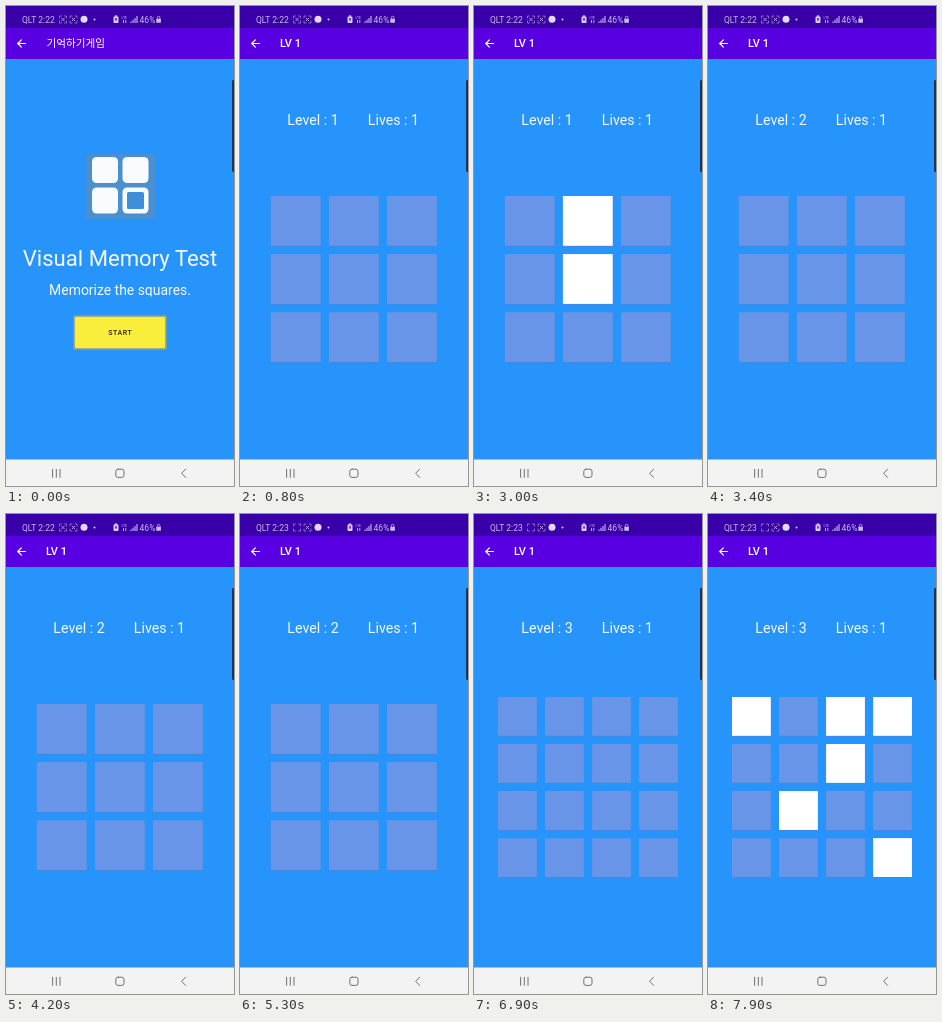
Animation of 228 by 480 pixels, one loop 8 s. Source, as an HTML page:

```html
<!DOCTYPE html>
<html lang="ko">
<head>
<meta charset="utf-8">
<title>Visual Memory Test</title>
<style>
  html, body { margin: 0; width: 100%; height: 100%; overflow: hidden; background: #2694fa; }
  svg { display: block; width: 228px; height: 480px; font-family: Roboto, "Noto Sans CJK KR", "Noto Sans CJK", sans-serif; }
  .title { font-size: 11px; font-weight: 500; fill: #fff; }
  .info { font-size: 14.2px; fill: #f4f8ff; text-anchor: middle; }
  .big { font-size: 22.1px; fill: #f4f8ff; text-anchor: middle; }
  .sub { font-size: 13.95px; fill: #f4f8ff; text-anchor: middle; }
  .status { font-size: 8.5px; fill: #c9bde6; }
  .line { fill: none; stroke-linecap: round; stroke-linejoin: round; }

  .screen { opacity: 0; animation: screen 8s linear infinite; }
  .screen.last { animation-name: last; }
  .flash { opacity: 0; animation: flash 8s step-end infinite; }
  .tap { opacity: 0; animation: tap 8s step-end infinite; }
  .before { animation: before 8s step-end infinite; }
  .after { opacity: 0; animation: after 8s step-end infinite; }

  @keyframes screen { 0% { opacity: 0 } 2.5%, 48% { opacity: 1 } 48.01%, 100% { opacity: 0 } }
  @keyframes last { 0%, 83.75% { opacity: 0 } 86.25%, 100% { opacity: 1 } }
  @keyframes flash { 0% { opacity: 1 } 10%, 100% { opacity: 0 } }
  @keyframes tap { 0% { opacity: 1 } 50%, 100% { opacity: 0 } }
  @keyframes before { 0% { opacity: 1 } 58.75%, 100% { opacity: 0 } }
  @keyframes after { 0% { opacity: 0 } 58.75%, 100% { opacity: 1 } }
</style>
</head>
<body>
<svg viewBox="0 0 228 480">
  <defs>
    <clipPath id="subClip"><rect x="0" y="275" width="228" height="15.6"/></clipPath>
    <g id="base">
      <rect width="228" height="480" fill="#2694fa"/>
      <rect y="22" width="228" height="31" fill="#5800e2"/>
      <path class="line" d="M19.5 37.5H11.8M15.4 33.8L11.7 37.5L15.4 41.2" stroke="#fff" stroke-width="1.2"/>
    </g>
    <path id="scan" class="line" d="M0 2V0H2M5 0H7V2M7 5V7H5M2 7H0V5" stroke="#b7a6de" stroke-width=".9"/>
    <path id="cross" class="line" d="M2.3 2.3L4.7 4.7M4.7 2.3L2.3 4.7" stroke="#c9bde6" stroke-width=".9"/>
  </defs>

  <g id="home">
    <use href="#base"/>
    <text class="title" x="40.5" y="41.3" style="font-size:10.6px">기억하기게임</text>
    <rect x="80" y="148" width="69" height="65" fill="#4a8fcf"/>
    <g fill="#f8fafc">
      <rect x="86" y="151" width="26" height="26" rx="4.5"/>
      <rect x="116.5" y="151" width="26" height="26" rx="4.5"/>
      <rect x="86" y="181.5" width="26" height="26" rx="4.5"/>
      <rect x="116.5" y="181.5" width="26" height="26" rx="4.5"/>
    </g>
    <rect x="121" y="186" width="17" height="17" rx="1.5" fill="#3f8fd8"/>
    <text class="big" x="114" y="260">Visual Memory Test</text>
    <g clip-path="url(#subClip)"><text class="sub" x="114" y="289.3">Memorize the squares.</text></g>
    <rect x="67.5" y="309.5" width="93" height="34" rx="1" fill="#9fae7c"/>
    <rect x="69" y="311" width="90" height="31" rx="1" fill="#f9ee3c"/>
    <text x="114.3" y="329.2" text-anchor="middle" font-size="7" font-weight="500" letter-spacing=".6" fill="#24240c">START</text>
  </g>

  <g id="levels"></g>

  <rect width="228" height="22" fill="#3900a9"/>
  <g class="status">
    <text class="before" x="16" y="16.7">QLT 2:22</text>
    <text class="after" x="16" y="16.7">QLT 2:23</text>
    <use href="#scan" x="53.5" y="10" opacity=".7"/>
    <use class="before" href="#cross" x="53.5" y="10"/>
    <use href="#scan" x="64" y="10" opacity=".7"/>
    <use href="#cross" x="64" y="10"/>
    <circle cx="78" cy="13.3" r="3.5" fill="#e2daf3"/>
    <circle cx="88.5" cy="13.5" r="1" fill="#d8cdf0"/>
    <rect x="107.5" y="10.6" width="5" height="6.4" rx=".8" fill="#d8cdf0"/>
    <rect x="108.8" y="9.4" width="2.4" height="1.4" fill="#d8cdf0"/>
    <path d="M109 13h2M110 12v3" stroke="#3900a9" stroke-width=".8"/>
    <text x="115.5" y="13" font-size="3.6">LTE</text>
    <path d="M117.5 17v-3M119.8 14v3" stroke="#c9bde6" stroke-width=".9"/>
    <path d="M125 17v-1.6M127 17v-3.2M129 17v-5M131 17v-7" stroke="#c9bde6" stroke-width="1.1"/>
    <text x="133.6" y="16.7">46%</text>
    <rect x="150.3" y="12.8" width="4.6" height="4" rx=".6"/>
    <path class="line" d="M151.3 12.8v-1.2a1.3 1.3 0 0 1 2.6 0v1.2" stroke="#c9bde6" stroke-width=".8"/>
  </g>

  <rect x="226" y="74" width="3" height="92" rx="1.2" fill="#1d3550"/>

  <rect y="453.5" width="228" height="26.5" fill="#f3f3f3"/>
  <g class="line" stroke="#707070" stroke-width="1">
    <path d="M46.6 463.3v8M50.3 463.3v8M54 463.3v8"/>
    <rect x="109.8" y="463.2" width="8.2" height="8.2" rx="2.2"/>
    <path d="M179.6 463.2L175.6 467.3L179.6 471.4"/>
  </g>
</svg>
<script>
  const LOOP = 8000;

  // Times in ms; cells are numbered row by row.
  const levels = [
    { size: 3, start: 400, flash: 1400, lit: [1, 4], taps: [2400, 2600] },
    { size: 3, start: 3100, flash: 4300, lit: [2, 3, 7, 8], taps: [5500, 5700, 6000, 6200] },
    { size: 4, start: 6700, flash: 7700, lit: [0, 2, 3, 6, 9, 15], taps: [], last: true }
  ];

  const grids = {
    3: { x: 30.8, y: 190, pitch: 58.1, side: 49.8 },
    4: { x: 24, y: 183, pitch: 47.05, side: 38.8 }
  };

  const delay = ms => `style="animation-delay:${ms - LOOP}ms"`;

  function square(level, i, attrs) {
    const g = grids[level.size];
    const x = g.x + (i % level.size) * g.pitch;
    const y = g.y + Math.floor(i / level.size) * g.pitch;
    return `<rect x="${x}" y="${y}" width="${g.side}" height="${g.side}" ${attrs}/>`;
  }

  function cell(level, i) {
    const shade = square(level, i, 'fill="#4a86d6" transform="translate(0 .9)" rx=".8"');
    const face = square(level, i, 'fill="#6895e8" rx=".6"');
    const k = level.lit.indexOf(i);
    if (k < 0) return shade + face;
    const white = (type, ms) => square(level, i, `class="${type}" fill="#fff" ${delay(ms)}`);
    const tap = level.taps[k];
    return shade + face + white("flash", level.flash) + (tap ? white("tap", tap) : "");
  }

  function screen(level, n) {
    const cells = Array.from({ length: level.size ** 2 }, (_, i) => cell(level, i)).join("");
    const timing = level.last ? 'class="screen last"' : `class="screen" ${delay(level.start)}`;
    return `<g ${timing}><use href="#base"/>
      <text class="title" x="40" y="41.3">LV 1</text>
      <text class="info" x="73" y="119">Level : ${n + 1}</text>
      <text class="info" x="153.4" y="119">Lives : 1</text>${cells}</g>`;
  }

  document.getElementById("levels").innerHTML = levels.map(screen).join("");
</script>
</body>
</html>
```
